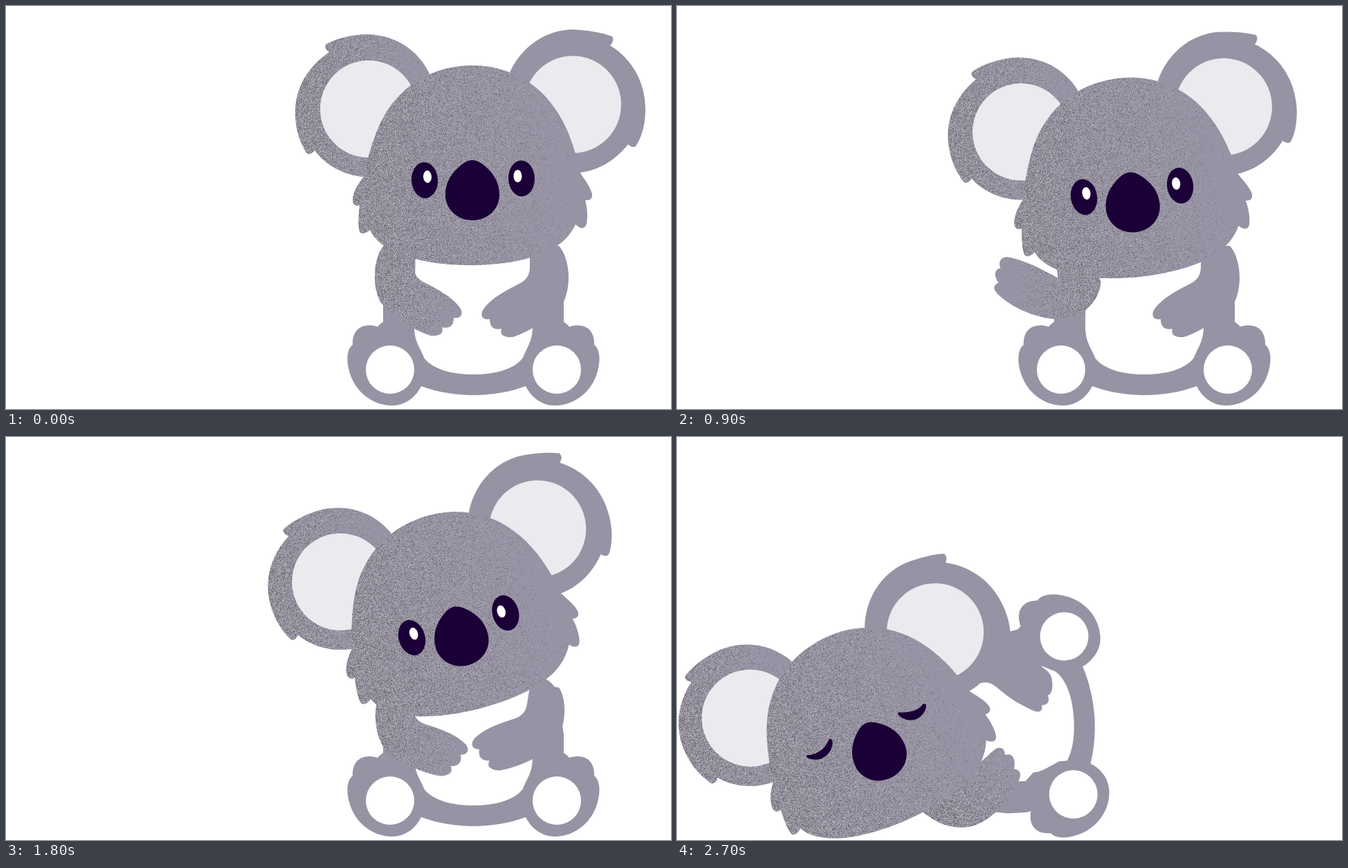
Recreate the animation shown at these times as an HTML page with a canvas. Size 961 by 583 pixels, loop 3000 ms.

```html
<!DOCTYPE html>
<html lang="en">
<head>
<meta charset="utf-8">
<title>Sleepy koala</title>
<style>
  html, body { margin: 0; width: 100%; height: 100%; overflow: hidden; background: #fff; }
  canvas { display: block; width: 961px; height: 583px; }
</style>
</head>
<body>
<canvas id="stage" width="961" height="583"></canvas>
<script>
const ctx = document.getElementById('stage').getContext('2d');
const FUR = '#9793a4', INNER = '#eaebef', INK = '#1b0038', WHITE = '#fff';
const STEP = 300;
const P = d => new Path2D(d);

const head = P(`M675 86C695 86 713 90 728 96C778 115 815 163 829 240C835 250 844 260 847 272
  Q848 282 837 281C840 292 841 305 839 315Q835 327 823 316C817 329 807 340 795 348
  C765 368 715 375 667 375C620 374 573 366 547 347C538 341 531 334 526 324
  C521 329 514 331 511 326C508 315 510 300 511 288C505 291 500 286 501 278
  C503 266 510 256 517 247C526 205 538 165 561 138C590 102 632 86 675 86Z`);
const earL = P(`M612 98C595 62 560 41 520 41C498 42 478 47 463 55Q458 60 467 67
  C436 88 418 118 418 155C418 177 425 198 434 212Q439 217 446 209
  C463 231 489 245 517 247L560 160Z`);
const earR = P(`M728 96C745 59 780 34 820 34C840 35 860 38 876 44Q880 50 873 57
  C905 77 924 110 924 150C924 170 919 190 910 203Q905 206 899 200
  C880 224 856 238 829 241L780 160Z`);
const nose = P(`M674 223C682 223 690 229 697 236C707 246 713 258 713 273
  C713 294 696 310 674 310C652 310 635 294 635 273C635 258 641 246 651 236
  C658 229 666 223 674 223Z`);
const lash = P(`M582 243C586 243 586 252 590 257C595 264 603 268 610 270
  C605 277 596 281 588 280C579 278 571 270 572 263C574 261 577 267 582 270
  C586 272 590 273 593 272C585 266 578 256 581 245Z`);
const lids = P(`M188 461C198 461 214 455 220 438Q224 436 224 443C223 456 213 465 202 466
  C194 466 187 464 188 461Z
  M320 399C332 400 349 398 356 387Q360 385 359 392C356 402 347 409 337 409
  C328 408 320 404 320 399Z`);
const torso = P(`M676 563C648 563 622 558 600 550L560 530L545 457L545 430L552 385
  C553 365 560 355 575 348L592 345L590 460C590 478 592 484 600 500Q603 506 604 509
  C617 526 645 533 676 533Z`);
const foot = P(`M600 550C592 566 577 578 558 578C528 578 503 556 496 528
  C492 514 492 497 501 490C500 470 513 457 537 464C539 461 542 459 545 457
  L575 455L590 470C590 478 592 484 600 500Q603 506 604 509L604 540Z`);

// Arms: outline, pivot, and where the grain starts (x, y, direction)
const arm = (d, pivot = [0, 0], grain) => ({ path: P(d), pivot, grain });
const rest = arm(`M547 345C530 365 529 405 541 428C555 446 590 470 614 477Q634 478 630 465
  Q647 468 647 451C657 453 661 446 657 438C645 420 622 409 601 398
  C592 392 589 385 589 375L589 345Z`, [658, 445], [540, 395, 20]);
const wave = arm(`M552 390C530 375 505 358 482 352C472 351 468 360 471 367
  C461 368 460 378 466 388C457 390 457 397 463 404C480 425 515 446 550 450
  C585 450 608 428 613 402L600 360L552 370Z`, [585, 405], [612, 412, 190]);
const tipL = arm(`M480 420C483 440 495 455 505 463C530 471 570 471 598 467
  C612 463 612 452 607 446C619 445 620 433 614 425C621 419 620 408 610 405
  C592 402 575 403 557 404L520 380Z`, [0, 0], [495, 450, -15]);
const tipR = arm(`M690 278C716 284 731 310 737 342L712 393C700 408 688 421 668 427
  C658 428 653 423 652 416C640 421 632 415 634 406C620 408 617 402 621 396
  C630 378 652 364 668 348C675 341 674 328 673 316Z`);
const rollL = arm(`M440 462C460 480 480 487 500 485C535 478 560 460 573 444
  C578 436 576 430 571 430C575 424 576 412 572 408C571 396 564 392 556 394
  C540 398 525 406 508 413L470 400Z`, [0, 0], [478, 480, -40]);
const rollR = arm(`M583 240C610 246 625 260 640 278L655 320L640 338
  C632 360 625 378 613 389C606 393 600 392 599 387C591 394 582 391 580 385
  C570 391 560 387 561 378C563 355 573 335 581 312C585 300 582 294 575 285Z`);
const lieL = arm(`M350 538C375 560 400 570 430 562C460 550 480 525 494 497
  C498 488 497 482 487 480C490 468 486 456 474 460C474 450 466 446 458 453
  C450 460 443 467 436 472L400 500Z`, [0, 0], [405, 562, -48]);
const lieR = arm(`M415 370C435 354 448 350 462 362C480 378 500 390 518 397
  C526 399 529 394 527 388C536 388 539 382 536 374C543 371 543 360 542 352
  C541 342 535 338 528 333L497 277L450 290Z`);

// head and body: x, y, degrees; arms: shape, x, y, degrees
const sit = [555, 526, 0];
const armR = [rest, 688, 447, 0], lowR = [rest, 674, 444, -9];
const upL = [rest, 665.5, 442, 0], dipL = [wave, 585, 405, -6];
const poses = [
  { head: [671.5, 145.75, 0], eyes: 'open', body: sit, left: [rest, 658, 445, 0], right: armR },
  { head: [676, 141, -4.1], eyes: 'open', body: sit, left: upL, right: armR },
  { head: [666.25, 150.75, -4.1], eyes: 'open', body: sit, left: upL, right: armR },
  { head: [643.5, 164, -5.8], eyes: 'open', body: sit, left: dipL, right: armR },
  { head: [660.75, 172.25, -0.6], eyes: 'shut', body: sit, left: [wave, 585, 405, 0], right: lowR },
  { head: [692, 172, 7.2], eyes: 'open', body: sit, left: dipL, right: lowR },
  { head: [625.75, 171.25, -13.8], eyes: 'open', body: sit, left: [rest, 667, 452, -9], right: lowR },
  { head: [474.75, 188.25, -30.4], eyes: 'shut', body: [539, 523, -21.2], left: [tipL, 0, 0, 0], right: [tipR, 0, 0, 0] },
  { head: [340.75, 253.5, -55.7], eyes: 'shut', body: [543, 529, -46.7], left: [rollL, 0, 0, 0], right: [rollR, 0, 0, 0] },
  { head: [239.5, 344.25, -23.75], eyes: 'asleep', body: [573.5, 529, -93.3], tuck: 12, left: [lieL, 0, 0, 0], right: [lieR, 0, 0, 0] }
];

let seed = 7;
function rnd() {
  seed = (Math.imul(seed, 1664525) + 1013904223) >>> 0;
  return seed / 4294967296;
}

// Speckle that is dense on the left and thins out to the right
function speckle(w, h) {
  const c = document.createElement('canvas');
  c.width = w;
  c.height = h;
  const g = c.getContext('2d'), img = g.createImageData(w, h);
  for (let i = 0; i < w * h; i++) {
    const dense = 0.9 * (1 - (i % w) / w) ** 1.2;
    if (rnd() > dense) continue;
    const v = rnd() < 0.56 ? 96 + 40 * rnd() : 160 + 30 * rnd();
    img.data.set([v, v - 2, v + 6, 205], i * 4);
  }
  g.putImageData(img, 0, 0);
  return c;
}
const headGrain = speckle(325, 292), earGrain = speckle(190, 210), armGrain = speckle(125, 260);

function fill(path, color) {
  ctx.fillStyle = color;
  ctx.fill(path);
}
function oval(x, y, rx, ry, color, tilt = 0) {
  ctx.fillStyle = color;
  ctx.beginPath();
  ctx.ellipse(x, y, rx, ry, tilt, 0, 7);
  ctx.fill();
}
function ink(path) {
  fill(path, INK);
  ctx.strokeStyle = INK;
  ctx.lineWidth = 1.6;
  ctx.lineJoin = 'round';
  ctx.stroke(path);
}
function group(draw) {
  ctx.save();
  draw();
  ctx.restore();
}
function place([x, y, deg], px, py, flip = 1) {
  ctx.translate(x, y);
  ctx.scale(flip, 1);
  ctx.rotate(deg * Math.PI / 180);
  ctx.translate(-px, -py);
}
function grainy(path, img, x, y, deg = 0, dy = 0) {
  fill(path, FUR);
  group(() => {
    ctx.clip(path);
    place([x, y, deg], 0, 0);
    ctx.drawImage(img, 0, dy);
  });
}

// tuck pulls the left foot in towards the belly
function drawBody(at, tuck = 0) {
  group(() => {
    place(at, 555, 526);
    for (const flip of [1, -1]) group(() => {
      if (flip < 0) {
        ctx.translate(1351, 0);
        ctx.scale(-1, 1);
      }
      fill(torso, FUR);
      if (flip > 0) ctx.translate(tuck, 0);
      fill(foot, FUR);
      oval(555, 526, 35, 35, WHITE);
    });
  });
}

function drawArm([shape, ...at], flip) {
  group(() => {
    place(at, ...shape.pivot, flip);
    if (shape.grain && flip > 0) {
      const [x, y, deg] = shape.grain;
      grainy(shape.path, armGrain, x, y, deg, -130);
      // the shoulder side behind the start is evenly speckled
      group(() => {
        ctx.clip(shape.path);
        place([x, y, deg], 0, 0);
        ctx.drawImage(armGrain, 0, 0, 20, 260, -20, -130, 20, 260);
      });
    } else fill(shape.path, FUR);
  });
}

function drawEyes(kind) {
  if (kind === 'open') {
    oval(605, 252, 19, 26, INK, -0.06);
    oval(609, 247, 6, 9, WHITE, -0.06);
    oval(745, 249.5, 19, 26, INK, -0.03);
    oval(739.5, 246, 6, 9, WHITE, -0.03);
  } else if (kind === 'shut') {
    group(() => {
      ctx.translate(9.85, -27.2);
      ink(lash);
    });
    group(() => {
      ctx.translate(1333.85, -22.8);
      ctx.scale(-1, 1);
      ink(lash);
    });
  }
}

function drawHead(at, eyes) {
  group(() => {
    place(at, 671.5, 145.75);
    grainy(earL, earGrain, 417, 40);
    fill(earR, FUR);
    oval(524, 149, 70, 70.3, INNER);
    oval(819, 142.5, 70, 70.3, INNER);
    grainy(head, headGrain, 500, 85);
    fill(nose, INK);
    drawEyes(eyes);
  });
  if (eyes === 'asleep') ink(lids);
}

function draw(pose) {
  ctx.fillStyle = WHITE;
  ctx.fillRect(0, 0, 961, 583);
  drawBody(pose.body, pose.tuck);
  drawArm(pose.right, pose.right[0] === rest ? -1 : 1);
  drawArm(pose.left, 1);
  drawHead(pose.head, pose.eyes);
}

ctx.imageSmoothingEnabled = false;
const start = performance.now();
let shown = -1;
function tick() {
  const i = Math.floor((performance.now() - start) / STEP) % poses.length;
  if (i !== shown) draw(poses[shown = i]);
  requestAnimationFrame(tick);
}
tick();
</script>
</body>
</html>
```
